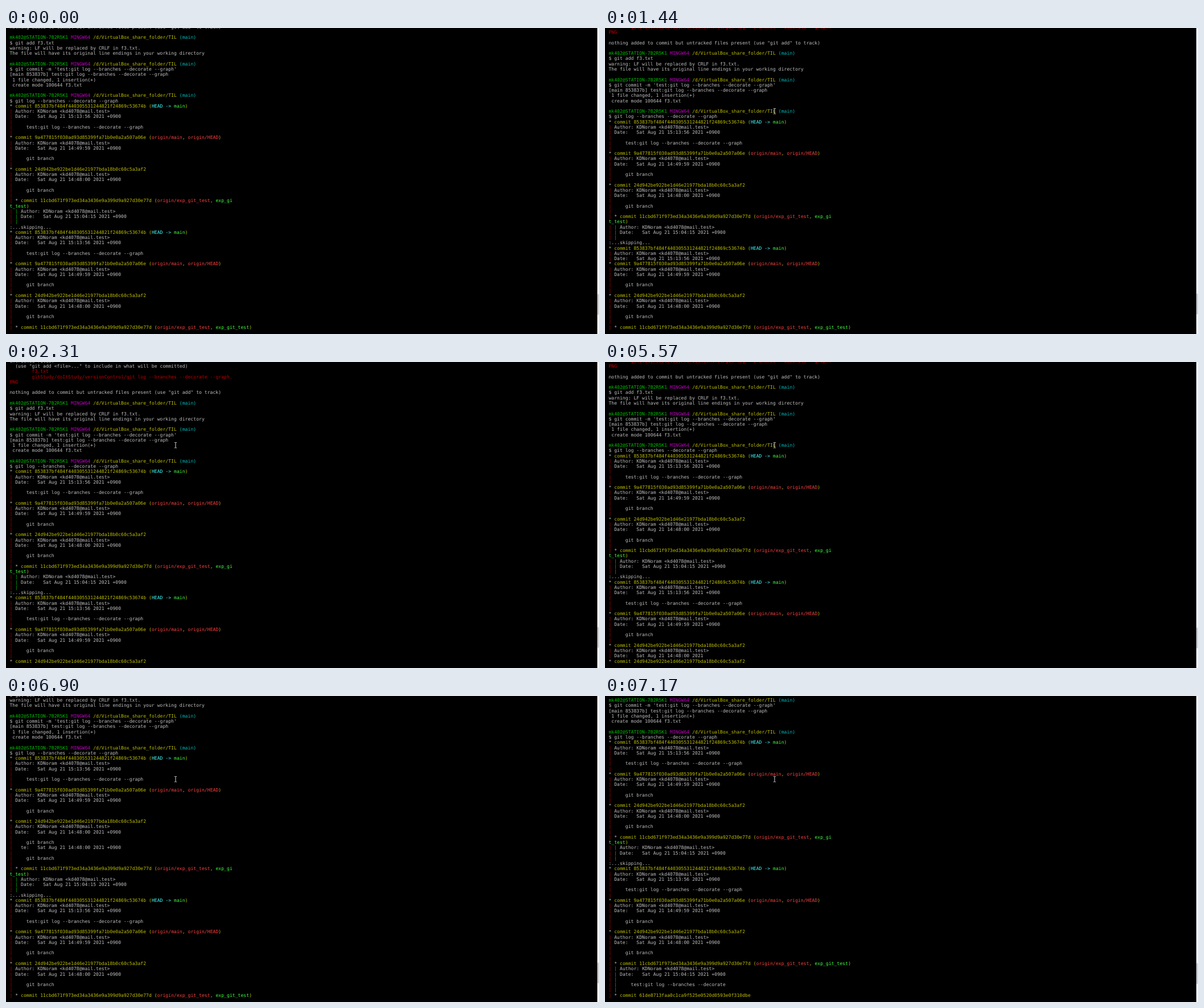
Animation of 1042 by 538 pixels, one loop 8 s. Source, as an HTML page:

```html
<!DOCTYPE html>
<html lang="en">
<head>
<meta charset="utf-8">
<title>Terminal log</title>
<style>
html, body { margin: 0; width: 100%; height: 100%; overflow: hidden; background: #000; }
svg { display: block; width: 1042px; height: 538px; }
text {
  font: 8.14px "DejaVu Sans Mono", "Liberation Mono", monospace;
  white-space: pre;
  text-rendering: geometricPrecision;
}
</style>
</head>
<body>
<svg viewBox="0 0 1042 538">
  <rect width="1042" height="538" fill="#000"/>
  <g id="rows"></g>
  <rect x="1039" width="3" height="538" fill="#f0f0f0"/>
  <rect id="thumb" x="1039" width="3" height="36" fill="#cdcdcd"/>
  <path id="beam" d="M-2 -4.5H-.5M.5 -4.5H2M0 -4.5V5M-2 5H-.5M.5 5H2" fill="none" stroke="#d8d8d8"/>
</svg>
<script>
const LOOP = 8000, ROWS = 57, PITCH = 9.256;
const COLORS = {
  w: '#bfbfbf', g: '#00bf00', m: '#bf00bf', y: '#bfbf00', c: '#00bfbf',
  r: '#bf0000', R: '#ff4040', G: '#40ff40', C: '#40ffff'
};

// "~x" switches to colour x
const PROMPT = '~gmk402@STATION-7B2R5K1 ~mMINGW64 ~y/d/VirtualBox_share_folder/TIL ~c(main)';
const LOG = 'git log --branches --decorate --graph';
const BAR = '~r|~w', BARS = '~r|~w ~g|~w';
const HASH = { exp: '11cbd671f973ed34a3436e9a399d9a927d30e77d' };

const info = (bar, time) => [
  `${bar} Author: KDNoram <kd4078@mail.test>`,
  `${bar} Date:   Sat Aug 21 ${time} 2021 +0900`,
  bar
];
const commit = (hash, refs, time, msg) => [
  `* ~ycommit ${hash}${refs}`, ...info(BAR, time), `${BAR}     ${msg}`, BAR
];
const history = () => [
  ...commit('853837bf484f440305531244821f24869c53674b', ' (~CHEAD -> ~Gmain~y)', '15:13:56', 'test:' + LOG),
  ...commit('9a477815f030ad93d85399fa71b0e0a2a507a06e', ' (~Rorigin/main~y, ~Rorigin/HEAD~y)', '14:49:59', 'git branch'),
  ...commit('24d942be922be1d46e21977bda18b0c60c5a3af2', '', '14:48:00', 'git branch')
];
const side = name => `${BAR} * ~ycommit ${HASH.exp} (~Rorigin/exp_git_test~y, ~G${name}`;

const lines = [
  'Untracked files:',
  '  (use "git add <file>..." to include in what will be committed)',
  '        ~rf3.txt',
  '        ~rgitStudy/doItStudy/versionControl/' + LOG + '.',
  '~rPNG',
  '',
  'nothing added to commit but untracked files present (use "git add" to track)',
  '',
  PROMPT,
  '$ git add f3.txt',
  'warning: LF will be replaced by CRLF in f3.txt.',
  'The file will have its original line endings in your working directory',
  '',
  PROMPT,
  `$ git commit -m 'test:${LOG}'`,
  `[main 853837b] test:${LOG}`,
  ' 1 file changed, 1 insertion(+)',
  ' create mode 100644 f3.txt',
  '',
  PROMPT,
  '$ ' + LOG,
  ...history(),
  side('exp_gi'),
  '~Gt_test~y)',
  ...info(BARS, '15:04:15'),
  ':...skipping...',
  ...history(),
  side('exp_git_test~y)'),
  ...info(BARS, '15:04:15'),
  BARS + '     test:git log --branches --decorate',
  BARS,
  BAR + ' * ~ycommit 61de8713faa0c1ca9f525e0520d0593e0f310dbe'
].map(toCells);

// Half-painted views keep the old view after the given row and column
const views = [
  { t: 0, top: 7 },
  { t: 1440, top: 4, old: 7, row: 44, col: 0 },
  { t: 1510, top: 4 },
  { t: 2310, top: 1 },
  { t: 5570, top: 4, old: 1, row: 55, col: 34 },
  { t: 5640, top: 4 },
  { t: 6240, top: 7 },
  { t: 6900, top: 10, old: 7, row: 28, col: 4 },
  { t: 6970, top: 10 },
  { t: 7170, top: 13 }
];

// Pointer positions: time, x, y
const pointer = [
  [70, 966, 496], [140, 770, 372], [210, 610, 272], [280, 505, 207], [350, 454.5, 178.5],
  [550, 464.5, 178], [620, 450, 175], [690, 424, 169], [760, 394, 163], [830, 365, 158],
  [900, 341, 154], [970, 322, 151], [1040, 309, 148.5], [1110, 301, 147], [1240, 298, 146]
];

function toCells(line) {
  const cells = [];
  let color = 'w';
  for (let i = 0; i < line.length; i++) {
    if (line[i] === '~') color = line[++i];
    else cells.push([line[i], color]);
  }
  return cells;
}

function rowCells(view, r) {
  const fresh = lines[view.top + r] || [];
  if (view.old === undefined || r < view.row) return fresh;
  const stale = lines[view.old + r] || [];
  if (r > view.row) return stale;
  const head = Array.from({ length: view.col }, (_, i) => fresh[i] || [' ', 'w']);
  return head.concat(stale.slice(view.col));
}

const $ = id => document.getElementById(id);
const SVG = 'http://www.w3.org/2000/svg';
const rows = [];
for (let r = -1; r < ROWS; r++) {
  const el = document.createElementNS(SVG, 'text');
  el.setAttribute('x', 6.4);
  el.setAttribute('y', (10.2 + r * PITCH).toFixed(2));
  $('rows').append(el);
  rows.push(el);
}

function paintRow(el, cells) {
  el.textContent = '';
  let span, last;
  for (const [ch, color] of cells) {
    if (color !== last) {
      span = document.createElementNS(SVG, 'tspan');
      span.setAttribute('fill', COLORS[color]);
      el.append(span);
      last = color;
    }
    span.textContent += ch;
  }
}

const latest = (list, time, key) => list.filter(item => item[key] <= time).pop();
let shown;

function draw() {
  const t = performance.now() % LOOP;
  const view = latest(views, t, 't');
  if (view !== shown) {
    shown = view;
    rows.forEach((el, i) => paintRow(el, rowCells(view, i - 1)));
    $('thumb').setAttribute('y', 466 + view.top * 0.3);
  }
  const p = latest(pointer, t, 0);
  $('beam').setAttribute('visibility', p ? 'visible' : 'hidden');
  if (p) $('beam').setAttribute('transform', `translate(${p[1]} ${p[2]})`);
  requestAnimationFrame(draw);
}
draw();
</script>
</body>
</html>
```
